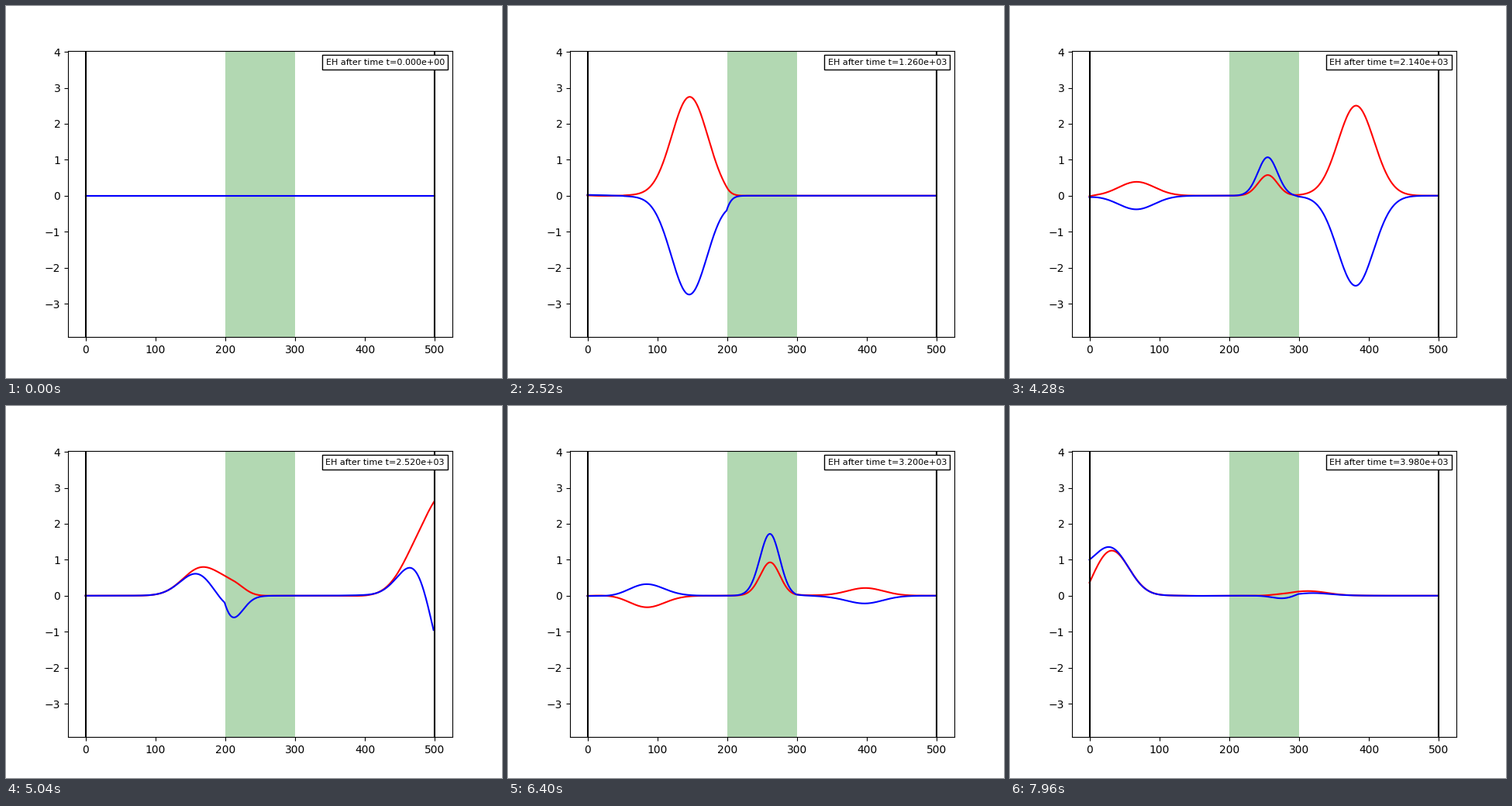
Recreate the animation shown at these times as a matplotlib script. Size 640x480 px, loop 8 s.

```python
import numpy as np
import matplotlib.pyplot as plt
from matplotlib.animation import FuncAnimation
from matplotlib.offsetbox import AnchoredText

CELLS = 500
SLAB = (200, 300)
INDEX = 1.85          # refractive index of the slab
COURANT = 0.364
SOURCE = 52
DELAY, WIDTH = 1000, 100
FRAMES, STEPS, INTERVAL = 200, 20, 40


def simulate():
    """March the 1D field equations and keep one snapshot per frame."""
    e = np.zeros(CELLS)
    h = np.zeros(CELLS)   # h[i] lies between e[i - 1] and e[i]
    ce = np.full(CELLS, COURANT)
    ce[SLAB[0]:SLAB[1]] /= INDEX ** 2
    shots = []
    for t in range(FRAMES * STEPS):
        if t % STEPS == 0:
            shots.append((e.copy(), h[1:].copy()))
        pulse = np.exp(-((t - DELAY) / WIDTH) ** 2)
        # one-cell-delay open ends: h on the left, e on the right
        h[0] = h[1]
        h[1:] += COURANT * (e[1:] - e[:-1])
        h[SOURCE] -= pulse
        e[-1] = e[-2]
        e[:-1] += ce[:-1] * (h[1:] - h[:-1])
        e[SOURCE] += pulse
    return shots


shots = simulate()

fig, ax = plt.subplots(figsize=(6.4, 4.8), dpi=100)
ax.axvspan(*SLAB, facecolor="green", alpha=0.3)
e_line, = ax.plot(np.arange(CELLS), shots[0][0], color="red", lw=1.5)
h_line, = ax.plot(np.arange(CELLS - 1), shots[0][1], color="blue", lw=1.5)
for wall in (0, CELLS):
    ax.axvline(wall, color="black", lw=1.5)
ax.set_xlim(-25, 525)
ax.set_ylim(-3.93, 4.032)

label = AnchoredText("", loc="upper right", prop=dict(size=8))
ax.add_artist(label)


def draw(i):
    e, h = shots[i]
    e_line.set_ydata(e)
    h_line.set_ydata(h)
    label.txt.set_text(f"EH after time t={i * STEPS:.3e}")
    return e_line, h_line, label


anim = FuncAnimation(fig, draw, frames=FRAMES, interval=INTERVAL,
                     init_func=lambda: draw(0), repeat=True, repeat_delay=0)
plt.show()
```
